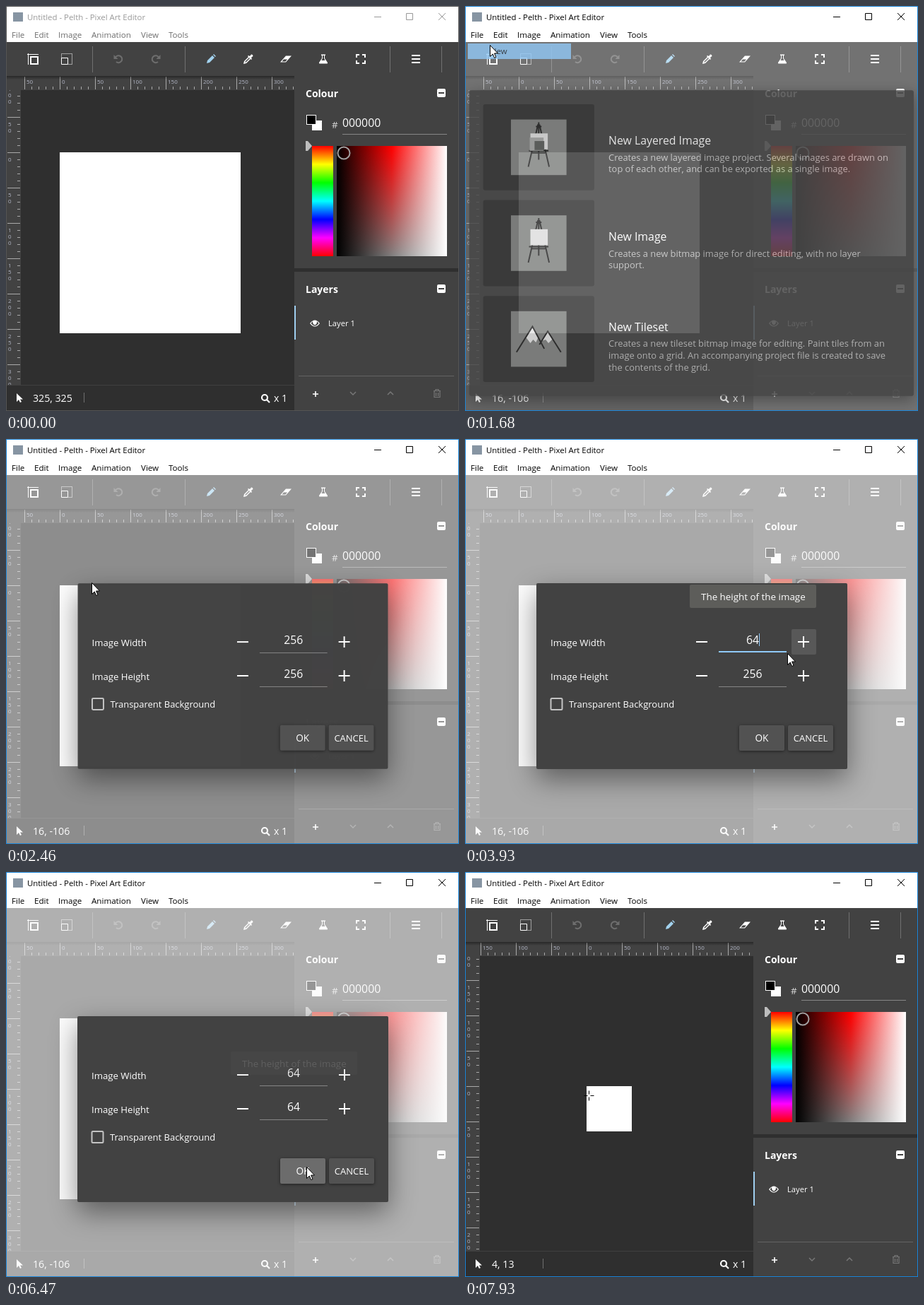
An HTML page with a canvas that plays this animation: 641 by 573 pixels, repeating every 8000 ms.

```html
<!DOCTYPE html>
<html lang="en">
<head>
<meta charset="utf-8">
<title>Pixel art editor</title>
<style>
html, body { margin: 0; width: 100%; height: 100%; overflow: hidden; background: #2f2f2f; }
canvas { display: block; width: 641px; height: 573px; }
</style>
</head>
<body>
<canvas id="stage" width="641" height="573"></canvas>
<script>
const W = 641, H = 573, LOOP = 8000, STEP = 77;
const FONT = '"Open Sans", "Noto Sans", sans-serif';
const PANEL = '#424242', DARK = '#2f2f2f', BLUE = '#9fcff0';
const stage = document.getElementById('stage').getContext('2d');
let g = stage;

const makeLayer = (w, h) => {
  const c = document.createElement('canvas');
  c.width = w;
  c.height = h;
  return c.getContext('2d');
};
const layer = makeLayer(W, H);
const clamp = v => Math.max(0, Math.min(1, v));

// Drawing helpers
function box(color, x, y, w, h, r = 0) {
  g.fillStyle = color;
  if (!r) return g.fillRect(x, y, w, h);
  g.beginPath();
  g.roundRect(x, y, w, h, r);
  g.fill();
}
function frame(color, x, y, w, h, lw = 1) {
  g.strokeStyle = color;
  g.lineWidth = lw;
  g.strokeRect(x, y, w, h);
}
function text(str, x, y, size, color = '#fff', align = 'left', weight = 400) {
  g.font = `${weight} ${size}px ${FONT}`;
  g.fillStyle = color;
  g.textAlign = align;
  g.fillText(str, x, y);
}
function icon(x, y, d, color = '#fff', lw = 0) {
  const p = new Path2D(d);
  g.save();
  g.translate(x, y);
  g.fillStyle = g.strokeStyle = color;
  g.lineWidth = lw;
  if (lw) g.stroke(p); else g.fill(p, 'evenodd');
  g.restore();
}
function faded(alpha, draw) {
  if (alpha <= 0) return;
  g.save();
  g.globalAlpha *= alpha;
  draw();
  g.restore();
}

// Lightness runs across, saturation down
const field = makeLayer(156, 156);
function paintField() {
  const ramp = stops => {
    const r = field.createLinearGradient(0, 0, 156, 0);
    stops.forEach((c, i) => r.addColorStop(i / (stops.length - 1), c));
    return r;
  };
  field.fillStyle = ramp(['#000', '#f00', '#fff']);
  field.fillRect(0, 0, 156, 156);
  field.fillStyle = ramp(['#000', '#fff']);
  for (let y = 0; y < 156; y++) {
    field.globalAlpha = y / 156;
    field.fillRect(0, y, 156, 1);
  }
}
paintField();

// Pointer path: time, x, y
const PATH = [
  [290, 401, 532], [600, 150, 170], [750, 92, 101], [830, 84, 78], [910, 23, 40],
  [1140, 23, 40], [1370, 35, 55], [1830, 35, 55], [2220, 121, 203], [2530, 121, 203],
  [2900, 418, 286], [3050, 420, 287], [3230, 456, 303], [5950, 456, 303],
  [6330, 425, 417], [6500, 425, 417], [6700, 418, 422], [7010, 416, 424],
  [7180, 416, 424], [7640, 184, 328], [7870, 179, 319], [7930, 176, 316]
];
function pointer(t) {
  const i = PATH.findIndex(k => k[0] > t);
  if (i < 0) return PATH[PATH.length - 1].slice(1);
  if (i === 0) return PATH[0].slice(1);
  const [a, x, y] = PATH[i - 1], [b, u, v] = PATH[i];
  const p = (t - a) / (b - a);
  return [Math.round(x + (u - x) * p), Math.round(y + (v - y) * p)];
}

// Moves happen in short steps counted from these times
const STARTS = [0, 290, 1140, 1680, 2530, 5950, 6780, 7180, 7870, 7930];
function snap(t) {
  const s = STARTS.filter(v => v <= t).pop();
  return s + Math.floor((t - s) / STEP) * STEP;
}

// Value of the last entry whose time has come
const pick = (table, t) => table.filter(k => k[0] <= t).pop()[1];
const WIDTHS = [[0, '256'], [3050, '25'], [3130, '2'], [3210, ''], [3760, '6'], [3930, '64']];
const HEIGHTS = [[0, '256'], [4940, '25'], [5170, '2'], [5320, ''], [5400, '6'], [5550, '64']];

function popupState(t, open, close) {
  if (t < open || t > close + 150) return null;
  const closing = t >= close, e = t - (closing ? close : open);
  const p = clamp(e / 150), rest = (1 - p) ** 3, grow = .1 * (1 - clamp(e / 220)) ** 5;
  return closing ? { a: rest, s: .9 + grow, dim: 1 - p } : { a: 1 - rest, s: 1 - grow, dim: p };
}

function titleBar(t) {
  const active = t >= 880, ink = active ? '#000' : '#999';
  box('#fff', 0, 0, W, 51);
  box('#8795a3', 10, 9, 14, 13);
  text('Untitled - Pelth - Pixel Art Editor', 30, 20, 11.4, ink);
  icon(0, 0, 'M521 15.5H531M566.5 10.5H575.5V19.5H566.5ZM612 10L622 20M622 10L612 20', ink, 1);
  if (t >= 900 && t < 1680) {
    box('#cce8ff', 1, 31, 32, 20);
    frame('#99d1ff', 1.5, 31.5, 31, 19);
  }
  const menus = { File: 8, Edit: 40, Image: 74, Animation: 121, View: 191, Tools: 230 };
  for (const name in menus) text(name, menus[name], 45, 11.6, active ? '#000' : '#6d6d6d');
}

function toolbar(t) {
  box(PANEL, 0, 51, W, 48);
  if (t >= 820 && t < 1220) icon(86, 75, 'M-18 0a18 18 0 1 0 36 0a18 18 0 1 0-36 0', 'rgba(255,255,255,.08)');
  for (const x of [122, 253, 543, 616]) box('#707070', x, 57, 1, 37);
  icon(38, 75, 'M-3-3H7V7H-3Z', '#fff', 2);
  icon(38, 75, 'M-8-6.5H8M-6.5-8V8', '#fff', 1);
  icon(86, 75, 'M-7.5-1.5H1.5V7.5H-7.5Z', '#fff', 1);
  g.setLineDash([1, 1]);
  icon(86, 75, 'M-7.5-1.5V-7.5H7.5V7.5H1.5', '#fff', 1);
  g.setLineDash([]);
  for (const [x, m] of [[159, 1], [212, -1]]) {
    g.save();
    g.translate(x, 75);
    g.scale(m, 1);
    icon(0, 0, 'M-4-2.5A5 5 0 1 1-3 4', '#6e6e6e', 2);
    icon(0, 0, 'M-6.5-6V0H-.5Z', '#6e6e6e');
    g.restore();
  }
  icon(290, 75, 'M-6 6L-5 2L2-5L5-2L-2 5ZM3-6L4-7L7-4L6-3Z', '#a2d2ee');
  icon(343, 75, 'M-7 7L-6 3L0-3L-1-4L0-5L2-4L4-6.5Q6.500-7 6.500-4L4-2L5 0L4 1L3 0L-3 6ZM-5 5L-3 4L2-1L1-2L-4 3Z');
  icon(396, 75, 'M-8 4.500L0-4.500H8L0 4.500ZM-5.500 3.500H-.5L2 .500H-3Z');
  icon(449, 75, 'M-3-6.500H3V-5H2V-1L6 5Q6.500 6.500 5 6.500H-5Q-6.500 6.500-6 5L-2-1V-5H-3ZM-1-5V-1L-2.500 2H2.500L1-1V-5Z');
  icon(502, 75, 'M-6-2V-6H-2M2-6H6V-2M6 2V6H2M-2 6H-6V2', '#fff', 2);
  icon(580, 75, 'M-6-5H6M-6 0H6M-6 5H6', '#fff', 2);
}

function rulers(ox, oy) {
  const ink = '#a9a9a9', num = '#b4b8c8';
  box('#424242', 1, 99, 407, 20);
  box('#424242', 1, 119, 20, 417);
  g.save();
  g.beginPath();
  g.rect(21, 99, 387, 20);
  g.clip();
  for (let v = -200; v <= 400; v += 10) {
    const major = v % 50 === 0, x = ox + v;
    box(ink, x, major ? 100 : 114, 1, major ? 18 : 4);
    if (major) text(String(Math.abs(v)), x + 3, 110, 8, num);
  }
  g.restore();
  g.save();
  g.beginPath();
  g.rect(1, 119, 20, 417);
  g.clip();
  for (let v = -250; v <= 350; v += 10) {
    const major = v % 50 === 0, y = oy + v;
    box(ink, major ? 2 : 16, y, major ? 18 : 4, 1);
    if (major) [...String(Math.abs(v))].forEach((c, i) => text(c, 3, y + 13 + i * 9, 8, num));
  }
  g.restore();
  g.fillStyle = g.createLinearGradient(0, 99, 0, 104);
  g.fillStyle.addColorStop(0, 'rgba(0,0,0,.4)');
  g.fillStyle.addColorStop(1, 'rgba(0,0,0,0)');
  g.fillRect(1, 99, 639, 5);
}

function collapse(y) {
  box('#fff', 610, y, 12, 12, 2);
  box(PANEL, 612, y + 5, 8, 2);
}

function sidePanels() {
  box(DARK, 408, 99, 233, 474);
  box(PANEL, 408, 99, 232, 272);
  text('Colour', 424, 129, 14, '#fff', 'left', 700);
  collapse(117);
  box('#fff', 433, 162, 14, 14);
  box('#000', 425, 154, 14, 13);
  frame('#fff', 425.5, 154.5, 13, 13);
  text('#', 461, 173, 13.5, '#ddd');
  text('000000', 476, 171, 15.8);
  box('#858585', 476, 181, 148, 1);
  const hue = g.createLinearGradient(0, 198, 0, 354);
  for (let i = 0; i <= 6; i++) hue.addColorStop(i / 6, `hsl(${i * 60} 100% 50%)`);
  box(hue, 433, 198, 30, 156);
  icon(424, 198, 'M0-7H3L9 0L3 7H0Z', '#bdbdbd');
  g.drawImage(field.canvas, 468, 198);
  icon(478, 208, 'M-8.500 0a8.500 8.500 0 1 0 17 0a8.500 8.500 0 1 0-17 0', '#a0a0a0', 2);

  box(PANEL, 408, 376, 232, 196);
  text('Layers', 424, 406, 14, '#fff', 'left', 700);
  collapse(394);
  box(BLUE, 408, 424, 2, 48);
  icon(437, 449, 'M-7 0Q0-9 7 0Q0 9-7 0ZM-5.500 0Q0 7 5.500 0Q4-2 2.500-2.700A3 3 0 1 1-2.500-2.700Q-4-2-5.500 0Z');
  text('Layer 1', 456, 453, 11.2);
  box('#636363', 414, 523, 220, 1);
  icon(438, 549, 'M-4 0H4M0-4V4', '#fff', 1.6);
  icon(491, 548, 'M-4-2L0 2L4-2', '#777', 1.5);
  icon(544, 548, 'M-4 2L0-2L4 2', '#777', 1.5);
  icon(610, 548, 'M-5-3.500H5M-2-3.500V-5.500H2V-3.500M-4-3V5.500H4V-3M-1.500-1V4M1.500-1V4', '#777', 1.2);
}

function statusBar(pos) {
  box(DARK, 1, 537, 407, 35);
  box('#404040', 1, 536, 407, 1);
  icon(15, 548, 'M0 0V12L3 9L5 13L7 12L5 8.500H9Z');
  text(pos, 38, 560, 14.2);
  box('#707070', 110, 547, 1, 14);
  icon(366, 554, 'M-4 0a4 4 0 1 0 8 0a4 4 0 1 0-8 0M3 3L7 7', '#fff', 2.2);
  text('x 1', 379, 560, 14);
}

function tooltip(str, x, y, w, h, alpha, size) {
  faded(alpha, () => {
    box('#5d5d5a', x, y, w, h, 2);
    text(str, x + 16, y + 22, size);
  });
}

function shadowed(draw, blur, dy, alpha) {
  g.save();
  g.shadowColor = `rgba(0,0,0,${alpha})`;
  g.shadowBlur = blur;
  g.shadowOffsetY = dy;
  draw();
  g.restore();
}

function easel(x, y, layered) {
  box('#7f817f', x - 40, y - 40, 80, 80);
  icon(x, y, 'M-1-33L-15 28M1-33L15 28M0-36V18M-11 8H11M-14 5H14M-4-30H4', '#222', 2);
  box('#dedede', x - 12, y - 20, 25, 23);
  if (layered) {
    box('#a5a7a5', x - 13, y - 14, 20, 19);
    box('#5a5c5a', x - 6, y - 9, 14, 13);
  }
}

function projectPopup() {
  shadowed(() => box(PANEL, .5, 115.5, 640, 440, 3), 20, 6, .4);
  const rows = [
    ['New Layered Image', 193.6, ['Creates a new layered image project. Several images are drawn on',
      'top of each other, and can be exported as a single image.']],
    ['New Image', 332, ['Creates a new bitmap image for direct editing, with no layer', 'support.']],
    ['New Tileset', 462, ['Creates a new tileset bitmap image for editing. Paint tiles from an',
      'image onto a grid. An accompanying project file is created to save', 'the contents of the grid.']]
  ];
  rows.forEach(([name, y, lines], i) => {
    const top = 135.5 + 138 * i, cy = top + 62;
    box('#323232', 20.5, top, 160, 124, 3);
    if (i < 2) easel(100.5, cy, i === 0);
    else {
      box('#7f817f', 60.5, cy - 40, 80, 80);
      icon(100.5, cy, 'M-9-18L-18-2L-12 6L-8 1L-4 5L-1-2ZM13-11L4 3L10 1L14 6L20 0Z', '#e4e4e4');
      icon(100.5, cy, 'M-32 19L-9-18L8 14M1 8L13-11L32 19', '#222', 2);
    }
    text(name, 201, y, 16.1);
    lines.forEach((s, n) => text(s, 201, y + 23 + n * 17, 13.1, '#bdbdbd'));
  });
}

function spinRow(label, y, value, focus, hover) {
  text(label, 121, y + 6, 13.2);
  if (hover) box('#585858', 462, y - 18, 35, 36, 2);
  icon(335, y, 'M-8 0H8', '#fff', 2);
  icon(479, y, 'M-8 0H8M0-8V8', '#fff', 2);
  text(value, 407, y + 3, 15.8, '#fff', 'center');
  if (focus) {
    box('#90caf9', 359, y + 13, 96, 2);
    box('#90caf9', Math.round(407 + g.measureText(value).width / 2), y - 12, 1, 18);
  } else box('#858585', 359, y + 15, 96, 1);
}

function button(label, x, size, hot) {
  shadowed(() => box(hot ? '#6c6c6c' : '#525252', x, 405, 64, 36, 2), 4, 1, .5);
  text(label, x + 32, 428, size, '#fff', 'center');
}

function sizeDialog(t, now) {
  shadowed(() => box(PANEL, 101, 204, 440, 263, 2), 38, 14, .45);
  spinRow('Image Width', 287, pick(WIDTHS, t), t >= 2920 && t < 4470, now >= 3150 && now < 6000);
  spinRow('Image Height', 335, pick(HEIGHTS, t), t >= 4540 && t < 6300, false);
  g.strokeStyle = '#c4c4c4';
  g.lineWidth = 2;
  g.beginPath();
  g.roundRect(121.5, 367, 16, 16, 1.5);
  g.stroke();
  text('Transparent Background', 147, 380, 13);
  button('OK', 388, 13.6, now >= 6250);
  button('CANCEL', 457, 13, false);
  const tip = 'The height of the image';
  if (now > 3060) tooltip(tip, 318, 206, 179, 33, clamp((6100 - now) / 150), 13.4);
  if (now > 6020) tooltip(tip, 318, 254, 179, 33, clamp((6440 - now) / 200), 13.4);
}

function showPopup(state, cx, cy, draw) {
  if (!state) return;
  g.fillStyle = `rgba(250,250,250,${.6 * state.dim})`;
  g.fillRect(1, 51, 639, 521);
  layer.clearRect(0, 0, W, H);
  g = layer;
  g.save();
  g.translate(cx, cy);
  g.scale(state.s, state.s);
  g.translate(-cx, -cy);
  draw();
  g.restore();
  g = stage;
  faded(state.a, () => g.drawImage(layer.canvas, 0, 0));
}

function fileMenu(t) {
  if (t < 900 || t >= 1830) return;
  const newRow = () => box('#91c9f7', 4, 53, 146, 22);
  if (t >= 1680) {
    faded(t < 1750 ? .8 : .35, () => {
      newRow();
      text('New', 36, 68, 11.4, '#222');
    });
    return;
  }
  const full = t >= 1050;
  if (!full && t < 960) return;
  shadowed(() => box(full ? '#f2f2f2' : 'rgba(140,138,136,.62)', 1, 51, 153, 204), full ? 4 : 0, 2, full ? .5 : 0);
  frame(full ? '#ccc' : '#777', 1.5, 51.5, 152, 203);
  if (t >= 1280) newRow();
  faded(full ? 1 : .7, () => {
    ['New', 'Recent Files', 'Open', 'Save', 'Save As', 'Export', 'Auto Export', 'Close', 'Revert'].forEach((s, i) => {
      const off = i === 1 || i === 3 || i === 8;
      text(s, 36, 68 + 22 * i, 11.4, off ? (full ? '#6d6d6d' : '#4a4a4a') : '#000');
    });
    icon(138, 86, 'M-2-3.500L1.500 0L-2 3.500', '#555', 1);
  });
}

function drawPointer(t, x, y) {
  if (t < 290) return;
  const onCanvas = x > 21 && x < 408 && y > 119 && y < 536;
  if (onCanvas && (t < 900 || t > 7180)) {
    const onImage = t > 7180 && x >= 172 && x < 236 && y >= 303 && y < 367;
    const early = t < 900 && x >= 76 && x < 332 && y >= 207 && y < 463;
    icon(x - .5, y + .5, 'M0-7V-2M0 2V7M-7 0H-2M2 0H7', onImage || early ? '#000' : '#ddd', 1);
    return;
  }
  const arrow = 'M.5 .5V16.500L4.300 13L6.700 18.500L9 17.500L6.600 12H11.500Z';
  icon(x, y, arrow);
  icon(x, y, arrow, '#000', 1);
}

function render(t) {
  const now = snap(t), [x, y] = pointer(now);
  const small = now >= 6500, ox = small ? 172 : 76, oy = small ? 303 : 207, size = small ? 64 : 256;
  const live = now < 750 || (now >= 7180 && x < 408);
  const pos = live ? `${x - ox}, ${y - oy}` : '16, -106';

  titleBar(now);
  box(DARK, 0, 51, W, 522);
  toolbar(now);
  box('#fff', ox, oy, size, size);
  rulers(ox, oy);
  sidePanels();
  statusBar(pos);
  if (now >= 820) tooltip('Change the size of the image', 13, 123, 209, 33, .75 * clamp((1460 - now) / 250), 13.2);
  showPopup(popupState(now, 1615, 2300), 320.5, 335.5, projectPopup);
  showPopup(popupState(now, 2335, 6500), 321, 335.5, () => sizeDialog(t, now));
  fileMenu(now);
  frame(now >= 880 ? '#1883d7' : '#555', .5, .5, W - 1, H - 1);
  drawPointer(now, x, y);
}

const start = performance.now();
function tick() {
  render((performance.now() - start) % LOOP);
  requestAnimationFrame(tick);
}
tick();
</script>
</body>
</html>
```
